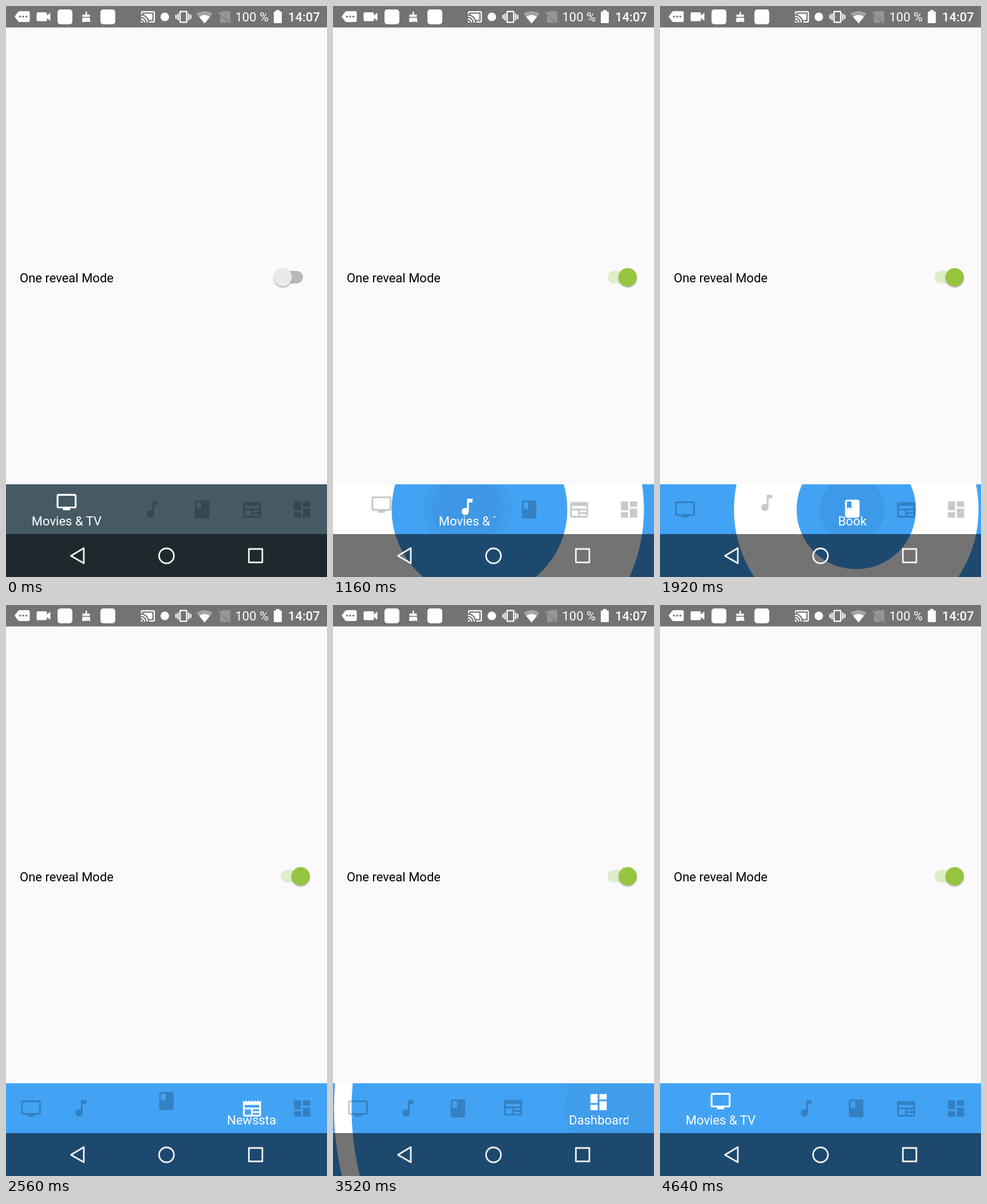
Recreate the animation shown at these times as an HTML page. Size 561 px wide and 998 px high, loop 4840 ms.

```html
<!DOCTYPE html>
<html lang="en">
<head>
<meta charset="utf-8">
<title>Reveal navigation</title>
<style>
  html, body { margin: 0; width: 100%; height: 100%; overflow: hidden; background: #faf9fc; }
  svg { display: block; width: 561px; height: 998px; }
  text { font: 22px Roboto, sans-serif; fill: #fff; }
</style>
</head>
<body>
<svg viewBox="0 0 561 998">
  <defs>
    <clipPath id="barClip"><rect y="836" width="561" height="162"/></clipPath>
    <clipPath id="tabClip"><rect y="836" width="561" height="87"/></clipPath>
    <clipPath id="labelClip"><rect id="labelBox" y="885" height="38"/></clipPath>
    <filter id="soft" x="-30%" y="-30%" width="160%" height="160%"><feGaussianBlur stdDeviation="1.3"/></filter>
  </defs>
  <rect width="561" height="998" fill="#faf9fc"/>

  <!-- status bar -->
  <rect width="561" height="37.5" fill="#757275"/>
  <g fill="#fff">
    <path d="M15 18.5l6-8q1-1.5 3-1.500h15q2.500 0 2.500 2.500v14q0 2.500-2.500 2.500h-15q-2 0-3-1.500z"/>
    <g fill="#757275"><circle cx="24.500" cy="18.500" r="1.700"/><circle cx="30" cy="18.500" r="1.700"/><circle cx="35.500" cy="18.500" r="1.700"/></g>
    <rect x="53.500" y="11" width="18" height="15.500" rx="2"/>
    <path d="M71 17l6.500-5.500v14.500l-6.500-5.500z"/>
    <rect x="90" y="6" width="26" height="26" rx="5"/>
    <rect x="165" y="6" width="26" height="26" rx="5"/>
    <path d="M139 10h2.500v5h5v4h-13v-4h5.500zM133.500 20.500h13l1 7.500h-3l-.5-3-.8 3h-2.500l-.5-3-.7 3h-6.500z"/>
    <path transform="translate(234.700 5.700) scale(1.110)" d="M1 18v3h3c0-1.660-1.340-3-3-3zm0-4v2c2.760 0 5 2.240 5 5h2c0-3.870-3.130-7-7-7zm18-7H5v1.630c3.960 1.280 7.090 4.410 8.370 8.370H19V7zM1 10v2c4.970 0 9 4.030 9 9h2c0-6.080-4.930-11-11-11zm20-7H3c-1.100 0-2 .9-2 2v3h2V5h18v14h-7v2h7c1.100 0 2-.9 2-2V5c0-1.100-.9-2-2-2z"/>
    <circle cx="277.500" cy="19" r="7.500"/>
    <path transform="translate(296 5) scale(1.170)" d="M0 15h2V9H0v6zm3 2h2V7H3v10zm19-8v6h2V9h-2zm-3 8h2V7h-2v10zM16.500 3h-9C6.670 3 6 3.670 6 4.500v15c0 .83.67 1.500 1.500 1.500h9c.83 0 1.500-.67 1.500-1.500v-15c0-.83-.67-1.500-1.500-1.500zM16 19H8V5h8v14z"/>
    <path d="M347 30.500L333 13.500q14-9 28 0z" opacity=".35"/>
    <path d="M347 30.500L337.500 19q9.500-6.500 19 0z"/>
    <path d="M379 9h11q2 0 2 2v16l-17-15zM372 10l20 20M374 15v12.500q0 2 2 2h12z" opacity=".25"/>
    <path d="M372 10.500l20 19" stroke="#fff" stroke-width="2" opacity=".3"/>
    <path d="M472 7h6v2.500h2.500q1.500 0 1.500 1.500v17.500q0 1.500-1.500 1.500h-11q-1.500 0-1.500-1.500V11q0-1.500 1.500-1.500h2.500z"/>
  </g>
  <text x="400.500" y="27">100 %</text>
  <text x="493" y="27" style="font-weight:500">14:07</text>

  <!-- switch row -->
  <text x="24" y="483" style="fill:#000">One reveal Mode</text>
  <rect id="track" x="480" y="463" width="39" height="22" rx="11"/>
  <g id="thumb">
    <circle id="halo" cy="474" fill="#777"/>
    <circle cy="476" r="16" fill="#000" opacity=".3" filter="url(#soft)"/>
    <circle id="knob" cy="474" r="16"/>
  </g>

  <!-- tab bar -->
  <g clip-path="url(#barClip)">
    <rect id="base" y="836" width="561" height="162"/>
    <circle id="white" cy="880" fill="#fff"/>
    <circle id="blue" cy="880" fill="#42a3f5"/>
  </g>
  <g clip-path="url(#tabClip)">
    <circle id="ripple" cy="880"/>
    <circle id="ripple2" cy="880"/>
  </g>
  <g id="icons"></g>
  <g clip-path="url(#labelClip)"><text id="label" y="908"></text></g>

  <!-- system navigation -->
  <rect y="923" width="561" height="75" opacity=".55"/>
  <g fill="none" stroke="#f2f2f2" stroke-width="2.800" stroke-linejoin="round">
    <path d="M113.500 961L136 947.500v26.500z"/>
    <circle cx="280.500" cy="961" r="13"/>
    <rect x="424.500" y="949" width="23.500" height="23.500"/>
  </g>
</svg>
<script>
const LOOP = 4840, STEP = 40, WIDTH = 561, SLOT = 87.3;
const WIDE = WIDTH - 4 * SLOT, MOVE = 400;
const DARK = '#455a64', BLUE = '#42a3f5';

const tabs = [
  ['Movies & TV', 'M21 3H3c-1.1 0-2 .9-2 2v12c0 1.1.9 2 2 2h5v2h8v-2h5c1.1 0 2-.9 2-2V5c0-1.1-.9-2-2-2zm0 14H3V5h18v12z'],
  ['Movies & TV', 'M12 3v10.55c-.59-.34-1.27-.55-2-.55-2.21 0-4 1.79-4 4s1.79 4 4 4 4-1.79 4-4V7h4V3h-6z'],
  ['Book', 'M18 2H6c-1.1 0-2 .9-2 2v16c0 1.1.9 2 2 2h12c1.1 0 2-.9 2-2V4c0-1.1-.9-2-2-2zM6 4h5v8l-2.5-1.5L6 12V4z'],
  ['Newsstand', 'M22 3l-1.67 1.67L18.67 3 17 4.67 15.33 3l-1.66 1.67L12 3l-1.67 1.67L8.67 3 7 4.67 5.33 3 3.67 4.67 2 3v16c0 1.1.9 2 2 2h16c1.1 0 2-.9 2-2V3zM11 19H4v-6h7v6zm9 0h-7v-2h7v2zm0-4h-7v-2h7v2zm0-4H4V8h16v3z'],
  ['Dashboard', 'M3 13h8V3H3v10zm0 8h8v-6H3v6zm10 0h8V11h-8v10zm0-18v6h8V3h-8z']
];

// Times in ms: touch, white reveal, blue reveal, tab resize.
const taps = [
  { to: 0, x: 106, touch: 0, white: 100, blue: 131, move: -MOVE },
  { to: 1, x: 256, touch: 1010, white: 1018, blue: 1054, move: 1044, rx: 235, rate: .513, twin: true },
  { to: 2, x: 343, touch: 1810, white: 1798, blue: 1829, move: 1847, rx: 336, rate: .518 },
  { to: 3, x: 430, touch: 2558, white: 2556, blue: 2587, move: 2548, rx: 428, rate: .51 },
  { to: 4, x: 517, touch: 3250, white: 3255, blue: 3286, move: 3290, rx: 515, rate: .51 },
  { to: 0, x: 43.6, touch: 3910, white: 4058, blue: 4085, move: 4086, rx: 40, rate: .14 }
];

const $ = id => document.getElementById(id);
const set = (el, attrs) => { for (const k in attrs) el.setAttribute(k, attrs[k]); };
const clamp = v => Math.min(1, Math.max(0, v));
const mix = (a, b, p) => a + (b - a) * p;
const mixColor = (a, b, p) => `rgb(${a.map((v, i) => Math.round(mix(v, b[i], p)))})`;

// Fast-out, slow-in: cubic-bezier(.4, 0, .2, 1)
function ease(x) {
  x = clamp(x);
  let lo = 0, hi = 1;
  for (let i = 0; i < 24; i++) {
    const s = (lo + hi) / 2, q = 1 - s;
    if (1.2 * s * q * q + .6 * s * s * q + s * s * s < x) lo = s; else hi = s;
  }
  return lo * lo * (3 - 2 * lo);
}

const icons = tabs.map(([, d]) => {
  const path = document.createElementNS('http://www.w3.org/2000/svg', 'path');
  path.setAttribute('d', d);
  return $('icons').appendChild(path);
});

function drawSwitch(t) {
  const p = ease((t - 80) / 250);
  set($('track'), { fill: mixColor([185, 183, 186], [223, 237, 201], p) });
  set($('knob'), { fill: mixColor([233, 233, 235], [150, 197, 63], p) });
  set($('thumb'), { transform: `translate(${mix(484, 515, p)} 0)` });
  set($('halo'), { r: 31 * clamp((t - 10) / 150), opacity: .16 * (1 - clamp((t - 260) / 240)) });
}

function drawReveal(t, tap, first) {
  const radius = start => WIDTH * ease((t - start) / MOVE);
  set($('base'), { fill: first ? DARK : BLUE });
  set($('white'), { cx: tap.x, r: radius(tap.white) });
  // the last sweep leaves every corner covered
  set($('blue'), { cx: tap.x, r: radius(tap.blue) });

  const r = tap.rate ? Math.min(110, Math.max(0, t - tap.touch) * tap.rate) : 0;
  const fade = 1 - clamp((t - tap.move - 130) / 300);
  set($('ripple'), { cx: tap.rx || 0, r, opacity: (tap.twin ? .03 : .055) * fade });
  set($('ripple2'), { cx: tap.rx || 0, r: tap.twin ? Math.max(0, r - 15) : 0, opacity: .035 * fade });
}

function drawTabs(t, tap, from) {
  const p = ease((t - tap.move) / MOVE);
  const active = t >= tap.move ? tap.to : from;
  const label = $('label');
  let left = 0;
  tabs.forEach(([name], i) => {
    let grow = 0;
    if (i === from) grow = 1 - p;
    if (i === tap.to) grow = from === tap.to ? 1 : p;
    const width = mix(SLOT, WIDE, grow), cx = left + width / 2;
    set(icons[i], {
      transform: `translate(${cx} ${880 - 13 * grow}) scale(1.58) translate(-12 -12)`,
      fill: i === active ? '#fff' : 'rgba(0,0,0,.21)'
    });
    if (i === active) {
      if (label.textContent !== name) label.textContent = name;
      const full = label.getComputedTextLength();
      const room = full > SLOT ? mix(SLOT, full, grow) : full;
      set(label, { x: cx - room / 2 });
      set($('labelBox'), { x: cx - room / 2, width: room });
    }
    left += width;
  });
}

function draw(now) {
  const t = Math.floor((now % LOOP) / STEP) * STEP;
  let n = 0;
  while (n + 1 < taps.length && t >= Math.min(taps[n + 1].touch, taps[n + 1].white, taps[n + 1].move)) n++;
  drawSwitch(t);
  drawReveal(t, taps[n], n === 0);
  drawTabs(t, taps[n], n ? taps[n - 1].to : 0);
}

const start = performance.now();
function tick() {
  draw(performance.now() - start);
  requestAnimationFrame(tick);
}
tick();
</script>
</body>
</html>
```
